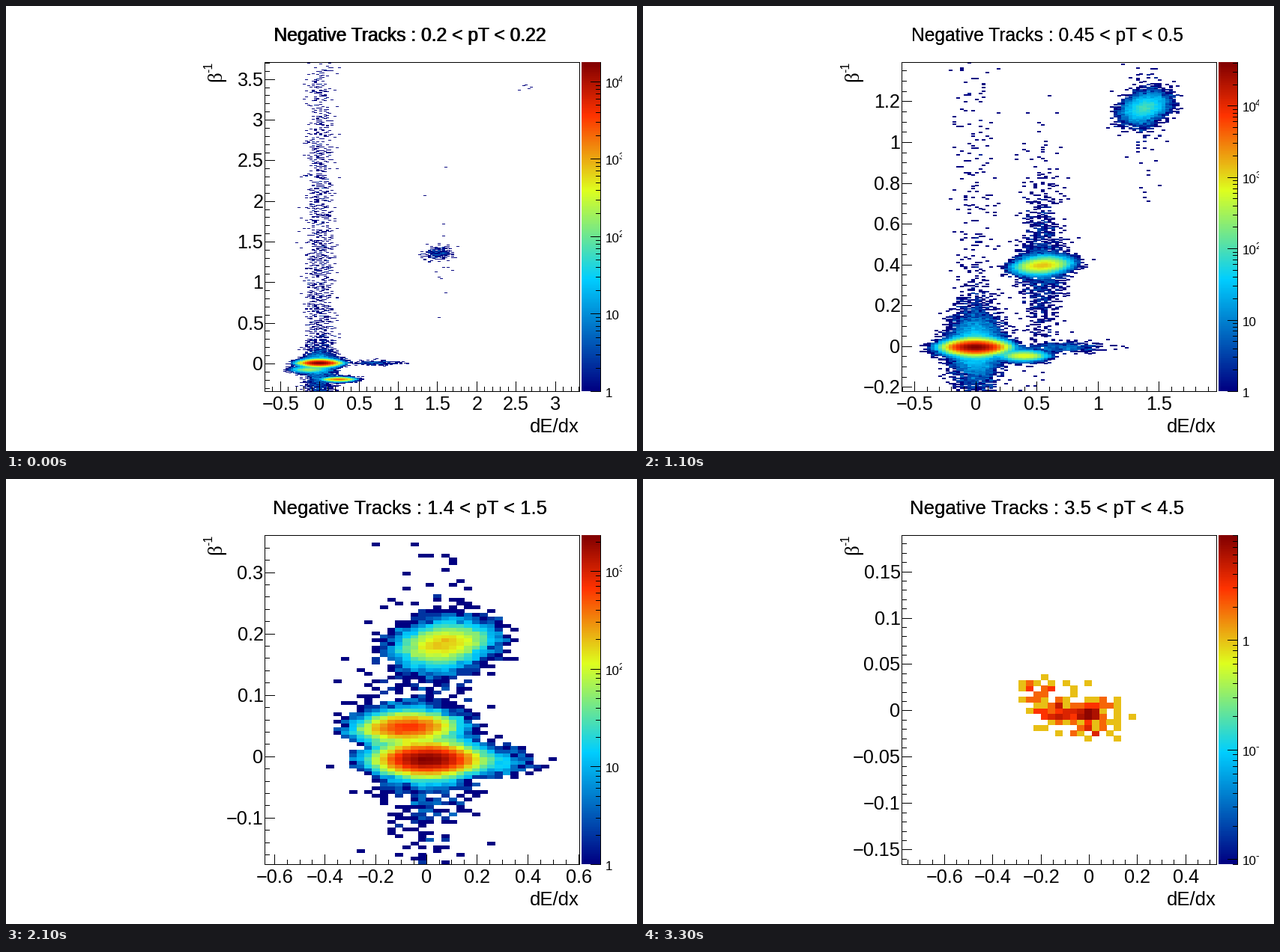
A matplotlib script that plays this animation: 842x595 px, repeating every 3.4 s.

```python
import numpy as np
import matplotlib.pyplot as plt
from matplotlib.animation import FuncAnimation
from matplotlib.colors import LinearSegmentedColormap
from matplotlib.patches import Rectangle

DPI, W, H = 100, 842, 595
LEFT, RIGHT, TOP, BOTTOM = 345, 765, 75, 515
BAR_LEFT, BAR_RIGHT = 768, 794
PW, PH = RIGHT - LEFT, BOTTOM - TOP
DX, DY = 0.03, 0.006                      # histogram bin size
M_E, M_MU, M_PI, M_K, M_P = 0.0005, 0.1057, 0.1396, 0.4937, 0.9383

EDGES = np.round(np.concatenate([
    np.arange(0.20, 0.39, 0.02), [0.4, 0.45], np.arange(0.5, 1.95, 0.1),
    np.arange(2.0, 2.9, 0.2), [3.0, 3.5, 4.5]]), 2)
FRAMES = len(EDGES) - 1

STOPS = [0, 0.34, 0.61, 0.84, 1]
RGB = zip([0, 0, 0.87, 1, 0.51], [0, 0.81, 1, 0.2, 0], [0.51, 1, 0.12, 0, 0])
CMAP = LinearSegmentedColormap.from_list("rainbow", list(zip(STOPS, RGB)), N=255)

plt.rcParams["font.family"] = "Liberation Sans"


def px(size):
    return size * 72 / DPI


def flight(m, p):
    """Inverse velocity relative to a pion."""
    return np.hypot(1, m / p) - np.hypot(1, M_PI / p)


def log_loss(m, p):
    """Log of the Bethe energy loss, flat on the Fermi plateau."""
    bg2 = min(p / m, 35) ** 2
    beta2 = bg2 / (1 + bg2)
    return np.log((8.6 + np.log(bg2) - beta2) / beta2)


def loss(m, p):
    return 1.16 * (log_loss(m, p) - log_loss(M_PI, p)) + 0.06


class Slice:
    """Simulated histogram for one momentum bin."""

    def __init__(self, i):
        lo, hi = EDGES[i], EDGES[i + 1]
        self.p = p = np.sqrt(lo * hi)
        self.title = f"Negative Tracks : {float(lo)} < pT < {float(hi)}"
        density = 5.585 - 2.121 * p + 0.1363 * p ** 2 - 0.188 / p
        self.zmax = round(10 ** density * (hi - lo) / 0.02)
        self.zmin = min(1, self.zmax / 1000)

        xk, xp = loss(M_K, p), loss(M_P, p)
        self.xlim = (min(0, xk, xp) - 0.535 - 0.034 / p,
                     max(0, xp) + 0.52 + 0.03 / p)
        self.ylim = (flight(M_E, p) - 0.161 - 0.018 / p + 0.0047 / p ** 2,
                     flight(M_P, p) + 0.156 + 0.024 / p + 0.0025 / p ** 2)
        nx = round((self.xlim[1] - self.xlim[0]) / DX)
        ny = round((self.ylim[1] - self.ylim[0]) / DY)
        self.X, self.Y = np.meshgrid(self.xlim[0] + (np.arange(nx) + 0.5) * DX,
                                     self.ylim[0] + (np.arange(ny) + 0.5) * DY)
        self.counts = np.random.default_rng(40 + i).poisson(self.expected())

    def blob(self, peak, x, y, sx, sy, tilt=0):
        """Gaussian in x; in y a Gaussian core with exponential flanks."""
        u = (self.X - x) / sx
        v = (self.Y - y - tilt * (self.X - x)) / sy
        return peak * np.exp(-0.5 * u * u - 5 * (np.sqrt(1 + v * v / 5) - 1))

    def tail(self, peak, x, y, scale):
        u = (self.X - x) / 0.09
        return peak * np.exp(-0.5 * u * u - np.abs(self.Y - y) / scale)

    def expected(self):
        p, z = self.p, self.zmax
        y0 = -0.006 + 0.0006 / p ** 2
        sx = 0.09 - 0.008 * p
        sy = 0.009 + 0.0009 / p

        # Pions, with mistimed tracks as a column
        n = self.blob(z - 1.3 * np.sqrt(z), 0, y0, sx, sy)
        n += self.tail(0.0035 * z, 0, y0, 0.05 - 0.006 * p)
        n += self.tail(0.7 * 10 ** (-0.9 * p), 0, 0, self.ylim[1])
        n += (self.Y < 0) * self.tail(8 * np.exp((0.2 - p) / 0.05), 0, 0, 0.3)

        # Kaons and antiprotons: mass, log abundance, spread, tilt
        heavy = [(M_K, 0.05 - 0.1 * p - 0.62 / p - 0.04 / p ** 2,
                  0.008 + 0.0009 / p + 0.001 / p ** 2, 0.02),
                 (M_P, -0.1 - 0.1 * p - 1.2 / p, 0.0065 + 0.0105 / p, 0.06)]
        for m, share, spread, tilt in heavy:
            peak, x, y = z * 10 ** share, loss(m, p), flight(m, p) + y0
            n += self.blob(peak, x, y, sx, spread, tilt / p)
            n += self.tail(0.004 * peak, x, y, 0.035 + 0.02 / p ** 2)

        # Electrons, muons and merged pairs
        n += self.blob(z * 10 ** (-2.4 + 0.3 / p), loss(M_E, p),
                       flight(M_E, p) + y0, 0.075, 0.009)
        n += self.blob(z * 10 ** (-1 - 4.5 * p), -0.14, flight(M_MU, p) + y0, sx, sy)
        n += self.blob(z * 10 ** (-3.6 - 0.25 * p), 0.72, y0, 0.14, sy)
        return n

    def level(self, v):
        """Place of a count on the logarithmic colour scale, 0 to 1."""
        return np.log(v / self.zmin) / np.log(self.zmax / self.zmin)

    def paint(self, img):
        ny, nx = self.counts.shape
        w, h = PW / nx, PH / ny
        cw, ch = int(np.ceil(w)), int(np.ceil(h))
        rows, cols = np.nonzero(self.counts)
        colors = CMAP(np.clip(self.level(self.counts[rows, cols]), 0, 1))[:, :3]
        for r, c, rgb in zip(rows, cols, colors):
            x, y = LEFT + round(c * w), TOP + max(round(PH - (r + 1) * h), 0)
            img[y:min(y + ch, BOTTOM), x:min(x + cw, RIGHT)] = rgb


def ticks(lo, hi):
    """Values with a major flag; at most ten major divisions."""
    sizes = [(m * 10.0 ** e, parts) for e in range(-3, 2)
             for m, parts in ((1, 5), (2, 4), (5, 5))]
    step, parts = next(s for s in sizes if (hi - lo) / s[0] <= 10)
    minor = step / parts
    for n in range(int(np.ceil(lo / minor)), int(np.floor(hi / minor)) + 1):
        yield n * minor, n % parts == 0


def number(v):
    return f"{round(v, 4) + 0:g}".replace("-", "\u2212")


fig = plt.figure(figsize=(W / DPI, H / DPI), dpi=DPI, facecolor="white")
ax = fig.add_axes([0, 0, 1, 1])
ax.axis("off")

base = np.ones((H, W, 3))
base[TOP:BOTTOM, BAR_LEFT:BAR_RIGHT] = CMAP(np.linspace(1, 0, PH))[:, None, :3]
stage = ax.imshow(base, extent=(0, W, H, 0), interpolation="nearest", aspect="auto")
ax.add_patch(Rectangle((822, 0), 20, H, color="white", lw=0, zorder=6))

ax.text(RIGHT, 570, "dE/dx", size=px(25.8), ha="right", va="baseline")
turn = dict(rotation=90, rotation_mode="anchor", ha="left", va="baseline")
ax.text(287, 101, "\u03b2", size=px(27), family="Liberation Serif", **turn)
ax.text(275, 89, "-1", size=px(16), **turn)
heads = [ax.text(539 + d, 47, "", ha="center", va="baseline") for d in (0, 0.5)]
labels = []


def label(x, y, s, size, ha):
    labels.append(ax.text(x, y, s, size=px(size), ha=ha, va="baseline"))


def draw_axes(img, s):
    img[[TOP, BOTTOM], LEFT:RIGHT + 1] = 0
    img[TOP:BOTTOM + 1, [LEFT, RIGHT]] = 0
    (x0, x1), (y0, y1) = s.xlim, s.ylim
    for v, major in ticks(x0, x1):
        x = round(LEFT + (v - x0) / (x1 - x0) * PW)
        img[BOTTOM - (13 if major else 6):BOTTOM, x] = 0
        if major:
            label(x + 0.5, 540, number(v), 25.3, "center")
    for v, major in ticks(y0, y1):
        y = round(BOTTOM - (v - y0) / (y1 - y0) * PH)
        img[y, LEFT:LEFT + (14 if major else 7)] = 0
        if major:
            label(343.5, y + 9, number(v), 25.3, "right")


def draw_scale(img, s):
    img[TOP:BOTTOM + 1, BAR_RIGHT - 1] = 0
    for e in range(-3, 6):
        for m in range(1, 10):
            v = m * 10.0 ** e
            if not s.zmin <= v <= s.zmax:
                continue
            y = round(BOTTOM - s.level(v) * PH)
            img[y, (780 if m == 1 else 787):BAR_RIGHT] = 0
            if m == 1:
                label(800, y + 8, "1" if e == 0 else "10", 17, "left")
                if e not in (0, 1):
                    label(817, y + 1, number(e), 13, "left")


def draw(i):
    s = Slice(i)
    while labels:
        labels.pop().remove()
    img = base.copy()
    s.paint(img)
    draw_axes(img, s)
    draw_scale(img, s)
    stage.set_data(img)
    # Longer titles are set smaller
    size = 25.7 - 1.05 * (len(s.title) - 32)
    for t in heads:
        t.set_text(s.title)
        t.set_fontsize(px(size))
    return []


anim = FuncAnimation(fig, draw, frames=FRAMES, interval=100,
                     init_func=lambda: draw(0), repeat=True, repeat_delay=0, blit=False)
plt.show()
```
